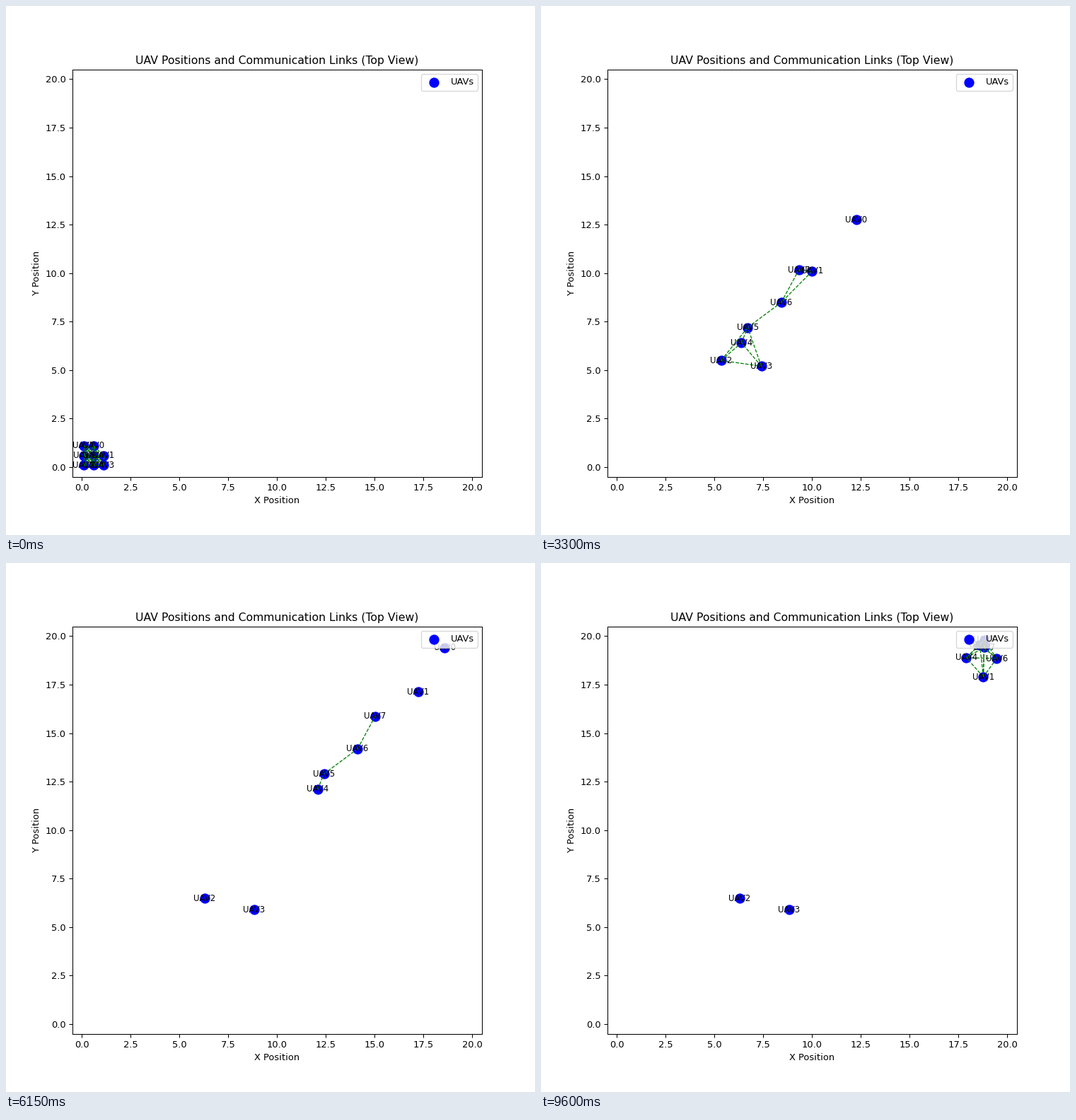
Write a matplotlib script that moves like this. It is 748 px wide and 748 px high and loops after 10000 ms.

```python
from itertools import combinations

import matplotlib.pyplot as plt
import numpy as np
from matplotlib.animation import FuncAnimation

FRAMES, INTERVAL = 200, 50
LINK_RANGE = 2.44
FAST, SLOW = 0.205, 0.1     # largest move per axis and step
LEADERS, SCOUTS = (0, 1), (6, 7)
SCOUT_END = 46              # scouts fall back to the slow pace here

GRID = [(1, 2), (2, 1), (0, 0), (2, 0), (1, 0), (0, 1), (1, 1), (0, 2)]

# Goals per vehicle: (departure step, x, y). It waits once a goal is reached.
GOALS = [
    [(0, 12.27, 12.76), (72, 14.29, 14.9), (101, 18.59, 19.56)],
    [(0, 7.69, 7.8), (47, 10, 10.1), (66, 14.55, 14.46), (110, 18.77, 17.9)],
    [(0, 4.63, 4.6), (57, 5.34, 5.53), (76, 6.29, 6.48)],
    [(0, 6.5, 4.3), (57, 8.83, 5.9)],
    [(0, 5.1, 4.57), (46, 6.38, 6.41), (66, 14.38, 14.52), (147, 17.9, 18.89)],
    [(0, 14.31, 15.41), (147, 18.82, 19.9)],
    [(0, 6.62, 6.69), (48, 16.62, 15.71), (147, 19.45, 18.85)],
    [(0, 8.6, 9.47), (46, 9.32, 10.17), (66, 16.84, 17.46),
     (147, 18.81, 19.43)],
]


def pace(i, step):
    sprinting = i in LEADERS or (i in SCOUTS and step < SCOUT_END)
    return FAST if sprinting else SLOW


def fly(i):
    """Path of one vehicle; each axis closes in on the goal on its own."""
    pos = 0.1 + 0.5 * np.array(GRID[i])
    path = []
    for step in range(FRAMES):
        path.append(pos)
        goal = [leg[1:] for leg in GOALS[i] if leg[0] <= step][-1]
        limit = pace(i, step)
        pos = pos + np.clip(goal - pos, -limit, limit)
    return path


paths = np.array([fly(i) for i in range(len(GRID))])
pairs = list(combinations(range(len(GRID)), 2))

plt.rcParams["font.family"] = "DejaVu Sans"
fig, ax = plt.subplots(figsize=(8, 8), dpi=93.5)
ax.set(xlim=(-.5, 20.5), ylim=(-.5, 20.5),
       xlabel="X Position", ylabel="Y Position",
       title="UAV Positions and Communication Links (Top View)")
ticks = np.arange(0, 20.1, 2.5)
ax.set_xticks(ticks)
ax.set_yticks(ticks)

dots = ax.scatter(*paths[:, 0].T, s=100, c="blue", label="UAVs")
links = [ax.plot([], [], "g--", lw=1)[0] for _ in pairs]
labels = [ax.text(0, 0, f"UAV{i}", fontsize=9, ha="center", va="center")
          for i in range(len(GRID))]
ax.legend(loc="upper right")


def update(step):
    pos = paths[:, step]
    dots.set_offsets(pos)
    for label, place in zip(labels, pos):
        label.set_position(place)
    for link, (a, b) in zip(links, pairs):
        link.set_visible(np.hypot(*(pos[a] - pos[b])) <= LINK_RANGE)
        link.set_data(*pos[[a, b]].T)
    return [dots, *links, *labels]


anim = FuncAnimation(fig, update, frames=FRAMES, interval=INTERVAL,
                     init_func=lambda: update(0), repeat=True, repeat_delay=0)
plt.show()
```
